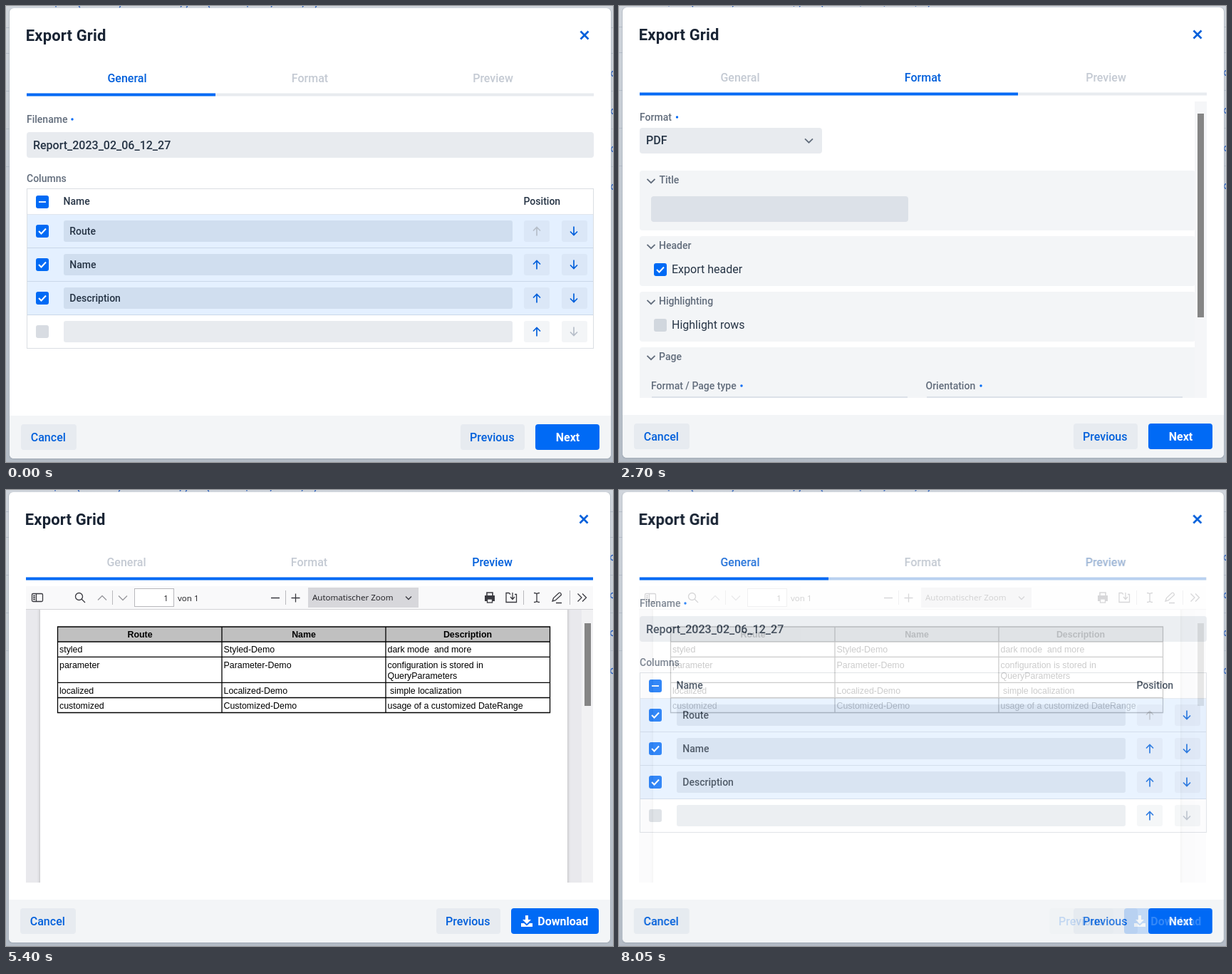
An HTML page for the animation above (8100 ms loop, 852 by 640 pixels).

```html
<!DOCTYPE html>
<html lang="en">
<head>
<meta charset="utf-8">
<title>Export Grid</title>
<style>
  html, body { margin: 0; width: 100%; height: 100%; overflow: hidden; background: #fff; }
  svg { display: block; width: 852px; height: 640px; overflow: hidden; }
  text { font: 500 16px Roboto, sans-serif; white-space: pre; fill: #263445; }
  .mid { text-anchor: middle; }
  .title { font-size: 22px; font-weight: 700; letter-spacing: .15px; fill: #192434; }
  .small { font-size: 14px; }
  .label { font-size: 14px; fill: #626d7c; }
  .plain { font-weight: 400; }
  .link { fill: #005fdb; }
  .main { fill: #fff; font-weight: 600; }
  .general { fill: var(--general, #c4cad3); }
  .format { fill: var(--format, #c4cad3); }
  .preview { fill: var(--preview, #c4cad3); }
  .blue { fill: #006af5; }
  .field { fill: #e8ebef; }
  .panel { fill: #f3f5f7; }
  .line { fill: none; stroke-width: 1.8; }
  .chev { fill: none; stroke: #626d7c; stroke-width: 1.8; }
  .up, .down { fill: none; stroke: #005fdb; stroke-width: 1.7; }
  .off { stroke: #b6bec9; }
  .tool text { font: 400 11.6px "Open Sans", "Noto Sans", sans-serif; fill: #1c1c20; }
  .icon { fill: none; stroke: #3a3a40; stroke-width: 1.3; }
  .sheet text { font: 400 12.4px "Liberation Sans", Arial, sans-serif; fill: #000; }
  .sheet .head { font-weight: 700; text-anchor: middle; }

  /* Each crossfade moves in 50 ms steps. */
  #formatStep { animation: showFormat 8.1s step-end infinite; }
  #previewStep { animation: showPreview 8.1s step-end infinite; }
  @keyframes showFormat {
    0% { opacity: 0 }
    30.86% { opacity: .2 }
    31.48% { opacity: .4 }
    32.09% { opacity: .6 }
    32.71% { opacity: .8 }
    33.33% { opacity: 1 }
    70%, 100% { opacity: 0 }
  }
  @keyframes showPreview {
    0% { opacity: 0 }
    64.19% { opacity: .2 }
    64.81% { opacity: .4 }
    65.43% { opacity: .6 }
    66.04% { opacity: .8 }
    66.66% { opacity: 1 }
    97.53% { opacity: .8 }
    98.14% { opacity: .6 }
    98.76% { opacity: .4 }
    99.38% { opacity: .2 }
    100% { opacity: 0 }
  }
</style>
</head>
<body>
<svg viewBox="0 0 852 640">
  <defs>
    <linearGradient id="shade" x1="0" y1="0" x2="0" y2="1">
      <stop offset="0" stop-color="#d0d5dc"/>
      <stop offset=".4" stop-color="#c3cad2"/>
      <stop offset="1" stop-color="#b3bbc5"/>
    </linearGradient>
    <filter id="pageShadow" x="-5%" y="-5%" width="110%" height="110%">
      <feDropShadow dx="0" dy="0" stdDeviation="2" flood-color="#000" flood-opacity=".28"/>
    </filter>

    <!-- Dialog frame shared by all steps -->
    <g id="shell">
      <rect x="-4" y="-4" width="864" height="650" fill="url(#shade)"/>
      <path d="M-4 30.5H860M-4 66.5H860M-4 119.5H860M-4 172.5H860M-4 225.5H860" stroke="#b3bbc6" fill="none"/>
      <path d="M70-3V1.500M102-3q0 4 2 5M161-3q0 4-2 5M245 1.500l3-4M255-3q0 4-2 5M284-3q0 4 2 5M339-3V1.500M372 1.500l3-4M416 1.500l3-4M436-3q0 4-2 5"
        fill="none" stroke="#3768bd" stroke-width="1.5"/>
      <g fill="none" stroke="#2c62c0" stroke-width="1.5">
        <circle cx="853" cy="95" r="3.500"/><circle cx="853" cy="148" r="3.500"/>
        <circle cx="853" cy="201" r="3.500"/><circle cx="853" cy="254" r="3.500"/>
      </g>
      <rect x="4" y="3" width="846" height="634" rx="6" fill="#a5aeb9" opacity=".55"/>
      <rect x="5" y="3" width="844" height="632" rx="6" fill="#fff"/>
      <path class="panel" d="M5 575H849V629a6 6 0 0 1-6 6H11a6 6 0 0 1-6-6Z"/>
      <text class="title" x="27.800" y="49">Export Grid</text>
      <path d="M806.500 35.500l11 11m0-11l-11 11" stroke="#005fdb" stroke-width="2.700"/>
      <text class="mid general" x="170" y="107">General</text>
      <text class="mid format" x="426.500" y="107">Format</text>
      <text class="mid preview" x="683.500" y="107">Preview</text>
      <rect class="field" x="29" y="122.500" width="796" height="4"/>
      <rect x="21" y="587" width="78" height="36" rx="4" fill="#e7ebf0"/>
      <text class="mid link" x="59.300" y="611">Cancel</text>
    </g>
    <g id="nextButtons">
      <rect x="638" y="587" width="90" height="36" rx="4" fill="#e7ebf0"/>
      <text class="mid link" x="682.300" y="611">Previous</text>
      <rect class="blue" x="743" y="587" width="90" height="36" rx="4"/>
      <text class="mid main" x="788.500" y="611">Next</text>
    </g>

    <g id="checked">
      <rect class="blue" x="-9" y="-9" width="18" height="18" rx="3"/>
      <path d="M-5 0l3.500 3.500L5-3.500" fill="none" stroke="#fff" stroke-width="2"/>
    </g>
    <rect id="unchecked" x="-9" y="-9" width="18" height="18" rx="3"/>
    <path id="arrowUp" d="M0 6.500V-5.500M-5-.5L0-5.500L5-.5"/>
    <path id="arrowDown" d="M0-6.500V5.500M-5 .5L0 5.500L5 .5"/>
    <path id="chevron" d="M-5.500-2.700L0 2.700L5.500-2.700"/>
    <g id="cells">
      <rect x="81" y="8" width="630" height="30" rx="3"/>
      <rect class="buttons" x="727" y="8" width="36" height="30" rx="3" fill="var(--button)"/>
      <rect x="780" y="8" width="36" height="30" rx="3" fill="var(--button)"/>
    </g>
    <g id="pickedRow" style="--button: #dbe7f7">
      <rect x="30" width="794" height="46" fill="#e4f0ff"/>
      <rect x="30" y="46" width="794" height="1" fill="#cad8e9"/>
      <use href="#cells" fill="#d0deef"/>
      <use href="#checked" x="51" y="23"/>
      <use class="down" href="#arrowDown" x="797" y="23"/>
    </g>
  </defs>

  <g id="generalStep" style="--general: #005fdb">
    <use href="#shell"/>
    <use href="#nextButtons"/>
    <rect class="blue" x="29" y="122.500" width="265" height="4"/>
    <text class="label" x="29" y="164">Filename</text>
    <circle class="blue" cx="93" cy="159" r="1.700"/>
    <rect class="field" x="29" y="177" width="796" height="36" rx="4"/>
    <text x="38" y="201">Report_2023_02_06_12_27</text>
    <text class="label" x="29" y="247">Columns</text>

    <use href="#pickedRow" y="293"/>
    <use href="#pickedRow" y="340"/>
    <use href="#pickedRow" y="387"/>
    <use href="#cells" y="434" fill="#e8ebef" style="--button: #f3f5f7"/>
    <use href="#unchecked" x="51" y="457" fill="#d8dce2"/>
    <use class="down off" href="#arrowDown" x="797" y="457"/>
    <use class="up off" href="#arrowUp" x="745" y="316"/>
    <use class="up" href="#arrowUp" x="745" y="363"/>
    <use class="up" href="#arrowUp" x="745" y="410"/>
    <use class="up" href="#arrowUp" x="745" y="457"/>
    <rect x="30" y="292" width="794" height="1" fill="#e0e6ee"/>
    <rect x="29.500" y="256.500" width="795" height="224" fill="none" stroke="#dadee3"/>
    <use class="blue" href="#unchecked" x="51" y="275"/>
    <path d="M46 275h10" stroke="#fff" stroke-width="1.800"/>
    <text class="small" x="80.500" y="279">Name</text>
    <text class="small" x="726.500" y="279">Position</text>
    <text class="small" x="89.300" y="321">Route</text>
    <text class="small" x="89.300" y="368">Name</text>
    <text class="small" x="89.300" y="415">Description</text>
  </g>

  <g id="formatStep" style="--format: #005fdb">
    <g transform="translate(0 -1)">
      <use href="#shell"/>
      <use href="#nextButtons"/>
      <rect class="blue" x="29" y="122.500" width="531" height="4"/>
    </g>
    <text class="label" x="29" y="161">Format</text>
    <circle class="blue" cx="81.500" cy="156" r="1.700"/>
    <rect class="field" x="29" y="171" width="256" height="36" rx="4"/>
    <text x="38" y="194">PDF</text>
    <use class="chev" href="#chevron" x="266.500" y="189"/>

    <g class="panel">
      <rect x="29" y="231" width="780" height="84" rx="4"/>
      <rect x="29" y="323" width="780" height="70" rx="4"/>
      <rect x="29" y="401" width="780" height="70" rx="4"/>
      <path d="M29 550V483a4 4 0 0 1 4-4H809V550Z"/>
    </g>
    <use class="chev" href="#chevron" x="45" y="245.500"/>
    <use class="chev" href="#chevron" x="45" y="337.500"/>
    <use class="chev" href="#chevron" x="45" y="415.500"/>
    <use class="chev" href="#chevron" x="45" y="493.500"/>
    <text class="label" x="56.500" y="249">Title</text>
    <rect x="45" y="267" width="361" height="36" rx="4" fill="#dce1e8"/>
    <text class="label" x="56" y="341">Header</text>
    <use href="#checked" x="58" y="370"/>
    <text class="plain" x="74" y="375">Export header</text>
    <text class="label" x="56" y="419">Highlighting</text>
    <use href="#unchecked" x="58" y="448" fill="#d1d7de"/>
    <text class="plain" x="74" y="453">Highlight rows</text>
    <text class="label" x="56" y="497">Page</text>
    <text class="label" x="45" y="538">Format / Page type</text>
    <circle class="blue" cx="172" cy="533" r="1.700"/>
    <text class="label" x="430.500" y="538">Orientation</text>
    <circle class="blue" cx="508" cy="533" r="1.700"/>
    <path d="M46 549H405M432 549H791" stroke="#dce1e8" stroke-width="2"/>
    <rect x="808" y="134" width="17" height="416" fill="#f5f6f8"/>
    <rect x="812" y="151" width="9" height="286" fill="#858585"/>
  </g>

  <g id="previewStep" style="--preview: #005fdb">
    <g transform="translate(-1 0)">
      <use href="#shell"/>
      <rect class="blue" x="29" y="122.500" width="796" height="4"/>
      <rect x="605" y="587" width="90" height="36" rx="4" fill="#e7ebf0"/>
      <text class="mid link" x="649.300" y="611">Previous</text>
      <rect class="blue" x="710" y="587" width="123" height="36" rx="4"/>
      <path fill="#fff" d="M730 597h4v6h4l-6 6l-6-6h4ZM724 608h4l4 3.500l4-3.500h4v5h-16Z"/>
      <text class="main" x="747.300" y="611">Download</text>
    </g>

    <rect x="28" y="168" width="796" height="383" fill="#e9e9ed"/>
    <svg x="28" y="168" width="780" height="383" viewBox="28 168 780 383">
      <rect x="48" y="150" width="740" height="420" fill="#fff" filter="url(#pageShadow)"/>
    </svg>
    <rect x="808" y="168" width="16" height="383" fill="#f1f1f3"/>
    <rect x="812" y="187" width="9" height="116" fill="#858585"/>

    <g class="tool">
      <rect x="28" y="135" width="796" height="32" fill="#f9f9fa"/>
      <rect x="28" y="167" width="796" height="1" fill="#d2d2d5"/>
      <path d="M149.500 141v20M392.500 141v20M726.500 141v20M791.500 141v20" stroke="#b9b9bd"/>
      <g class="icon">
        <rect x="36.500" y="145.500" width="15" height="11" rx="1.500"/>
        <path d="M42.500 146v10M38 148.500h3M38 151h3M38 153.500h3"/>
        <circle cx="102.500" cy="149.500" r="5"/>
        <path d="M106 153l5 5"/>
        <path d="M129 154.500l6-6l6 6M158 148.500l6 6l6-6" stroke="#98989d"/>
        <path d="M372 151.500h12M400.500 151.500h12M406.500 145.500v12"/>
        <rect x="180.500" y="138.500" width="55" height="25" fill="#fff" stroke="#b8b8bc" stroke-width="1"/>
      </g>
      <text x="228" y="156" text-anchor="end">1</text>
      <text x="241" y="156">von 1</text>
      <rect x="424" y="137" width="155" height="28" fill="#d7d7db"/>
      <text x="430" y="155">Automatischer Zoom</text>
      <path class="icon" d="M561 149.500l4 4l4-4"/>
      <g class="icon">
        <path d="M675 148v-4h8v4" stroke-width="1.600"/>
        <path d="M672 148h14v8h-3v-3h-8v3h-3Z" fill="#3a3a40" stroke="none"/>
        <rect x="675.500" y="153" width="7" height="5"/>
        <path d="M708 146.500l-2-2h-4v13h14.500v-11h-2.500M711 144v9M708 150l3 3.500l3-3.500"/>
        <path d="M741 144.500q4 0 4 2v9q0 2-4 2M749 144.500q-4 0-4 2v9q0 2 4 2"/>
        <path d="M767 156l1.500-4.500l7.500-7q2-1 3 1t-1 3l-7 6.500ZM772 158.500h8"/>
        <path d="M802.500 145.500l5.500 5.500l-5.500 5.500M809 145.500l5.500 5.500l-5.500 5.500"/>
      </g>
    </g>

    <g class="sheet">
      <rect x="72.500" y="192" width="691" height="21" fill="#c0c0c0"/>
      <path d="M72.500 192H763.500V312.500H72.500ZM72.500 213H763.500M72.500 234.300H763.500M72.500 270.300H763.500M72.500 291.500H763.500M303 192V312.500M533 192V312.500"
        fill="none" stroke="#000" stroke-width="1.300"/>
      <text class="head" x="188" y="207">Route</text>
      <text class="head" x="418" y="207">Name</text>
      <text class="head" x="648" y="207">Description</text>
      <text x="75" y="228">styled</text>
      <text x="305.500" y="228">Styled-Demo</text>
      <text x="535.500" y="228">dark mode  and more</text>
      <text x="75" y="250">parameter</text>
      <text x="305.500" y="250">Parameter-Demo</text>
      <text x="535.500" y="250">configuration is stored in</text>
      <text x="535.500" y="265">QueryParameters</text>
      <text x="75" y="286">localized</text>
      <text x="305.500" y="286">Localized-Demo</text>
      <text x="535.500" y="286"> simple localization</text>
      <text x="75" y="307">customized</text>
      <text x="305.500" y="307">Customized-Demo</text>
      <text x="535.500" y="307">usage of a customized DateRange</text>
    </g>
  </g>
</svg>
</body>
</html>
```
